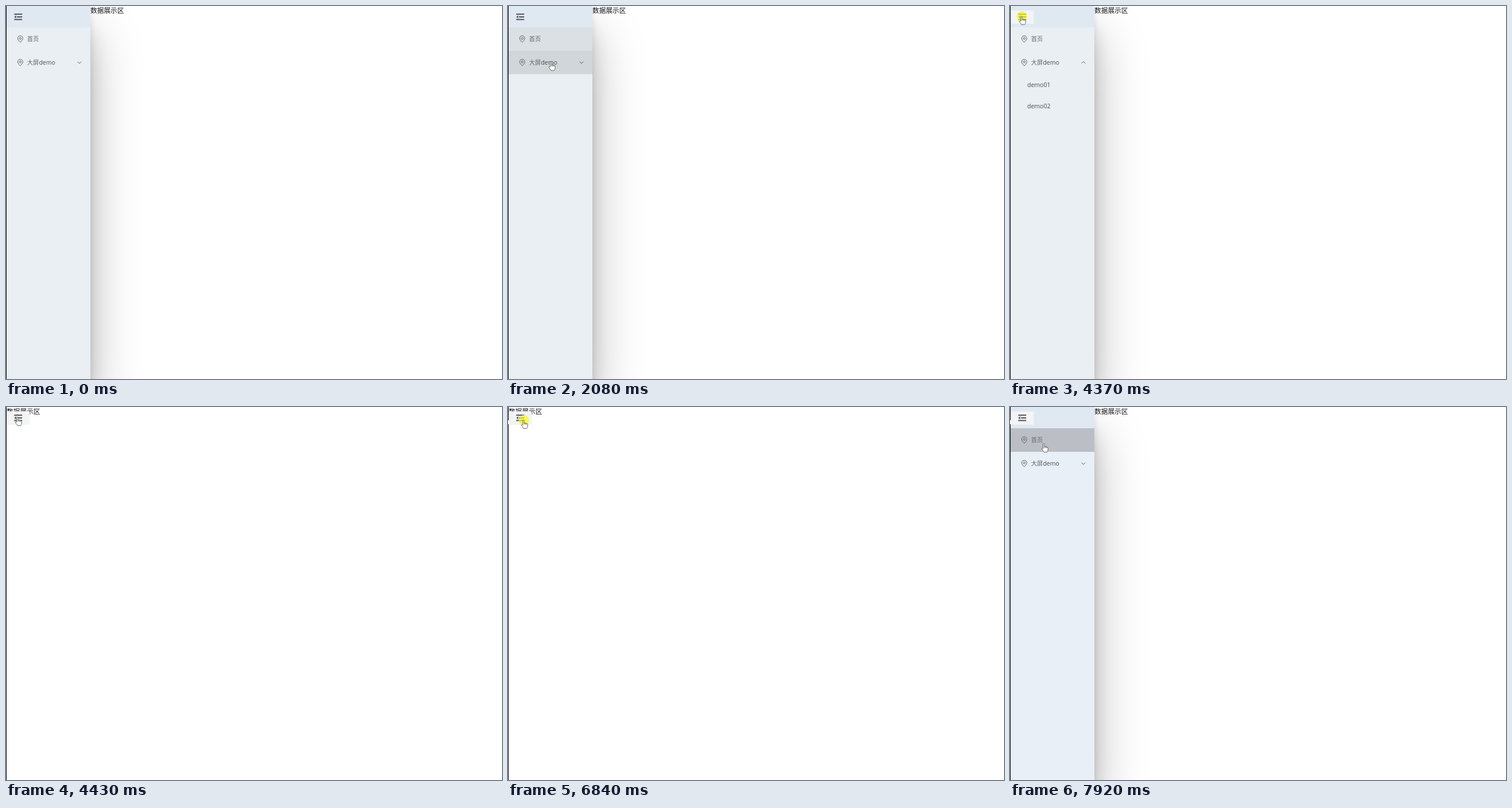
Animation, 864 px wide and 649 px high, one loop 7.99 s. Source, as an HTML page:

```html
<!DOCTYPE html>
<html lang="zh-CN">
<head>
<meta charset="utf-8">
<title>Sidebar menu</title>
<style>
  html, body { margin: 0; width: 100%; height: 100%; overflow: hidden; background: #fff; }
  #stage { position: fixed; inset: 0; overflow: hidden; contain: strict; }
  #shade { position: absolute; left: 1px; top: 0; width: 146px; height: 100%;
    box-shadow: 0 50px 90px rgba(0, 0, 0, .28), 0 40px 34px rgba(0, 0, 0, .12), 0 12px 12px rgba(0, 0, 0, .1); }
  svg { position: absolute; left: 0; top: 0; display: block; }
  text { font: 10.5px "Open Sans", "Noto Sans CJK SC", "Noto Sans CJK", sans-serif; fill: #4a4c50; }
  .cjk { font: 10.25px "Noto Sans CJK SC", "Noto Sans CJK", sans-serif; fill: #63666b; }
  #title { font-size: 11.7px; fill: #111; }
  .line { fill: none; stroke: #5c5f64; stroke-width: 1; }
  .hover { opacity: 0; }
  .pointer { fill: #fff; stroke: #444; stroke-width: .8; stroke-linejoin: round; }
</style>
</head>
<body>
<div id="stage">
  <div id="shade"></div>
  <svg width="864" height="649" viewBox="0 0 864 649">
    <defs>
      <clipPath id="fold"><rect id="foldBox" x="1" y="118.7" width="146" height="0"/></clipPath>
      <g id="pin" class="line">
        <path d="M0 5.6C-2.2 3.2-4.5 1-4.5-1.3A4.5 4.5 0 0 1 4.5-1.3C4.5 1 2.2 3.2 0 5.6Z"/>
        <circle cy="-1.2" r="1.7"/>
      </g>
    </defs>

    <text id="title" class="cjk" y="12.4">数据展示区</text>

    <g id="side">
      <rect id="panel" x="1" width="146" height="649"/>
      <rect x="1" width="146" height="37" fill="#e0e8f2"/>
      <rect id="row1" class="hover" x="1" y="37" width="146" height="41"/>
      <rect id="row2" class="hover" x="1" y="78" width="146" height="40.7"/>
      <use href="#pin" x="24.8" y="57.6"/>
      <use href="#pin" x="24.8" y="98.5"/>
      <text class="cjk" x="36.8" y="61.3">首页</text>
      <text class="cjk" x="36.8" y="102.2">大屏</text>
      <text x="57.4" y="102">demo</text>
      <path id="chevron" class="line" d="M-3.4-1.5L0 1.6L3.4-1.5"/>
      <g clip-path="url(#fold)">
        <text x="30" y="141">demo01</text>
        <text x="30" y="177.6">demo02</text>
      </g>
    </g>

    <rect width="1" height="649"/>
    <rect id="chip" y="23" width="1" height="7" fill="#fff"/>
    <rect id="button" x="1" y="7.5" width="40.5" height="23.5" rx="2" fill="#f2f4f6"/>
    <path fill="#4f5256" d="M14.3 13.2h13.9v2H14.3zM19 17.9h9.2v2H19zM14.3 22.6h13.9v2H14.3zM14.3 18.9l3.4-2.6v5.2z"/>
    <g id="cursor">
      <circle id="ring" cx=".5" cy=".8" r="9" fill="#f8f61a" opacity=".7"/>
      <path id="arrow" class="pointer" d="M.4.5V12L3.1 9.5L5 13.7L6.8 12.9L5 8.8H8.6Z"/>
      <path id="hand" class="pointer" d="M-1.3 9.5V1.6Q-1.3.5-.2.5T.9 1.6V6Q2 5.2 3 6.3Q4.2 5.6 5 6.9Q7.2 6.3 7.2 8.5V11Q7.2 13.5 5.6 15.5H.2Q-1.5 12.8-3.6 10.2Q-4 8.6-2.6 8.6ZM.9 6V8.4M3 6.3V8.5M5 6.9V8.7"/>
    </g>
  </svg>
</div>
<script>
const LOOP = 7990, STEP = 65;
const CLOSE = 4430, REOPEN = 6910;

const $ = id => document.getElementById(id);
const show = (id, on) => { $(id).style.display = on ? '' : 'none'; };
const within = (t, from, to) => t >= from && t < to;
const clamp = v => Math.min(1, Math.max(0, v));
const ease = p => p * p * (3 - 2 * p);

// Fades in from `on` and back out from `off`
const fade = (t, on, off = Infinity) => clamp((t - on) / 250) - clamp((t - off) / 250);

// Pointer strokes: start and end time, then where the stroke ends
const origin = { x: 782, y: 548 };
const strokes = [
  { from: 540, to: 730, x: 161, y: 80 },
  { from: 1800, to: 2150, x: 68, y: 98 },
  { from: 3690, to: 3960, x: 20, y: 17 },
  { from: 4820, to: 4880, x: 47, y: 45 },
  { from: 5420, to: 5690, x: 2, y: 2 },
  { from: 5750, to: 6170, x: 30, y: 24 },
  { from: 6240, to: 6370, x: 27, y: 22 },
  { from: 7590, to: 7850, x: 59, y: 63 }
];

// The pointer is sampled in steps, as a screen recorder does
function pointerAt(t) {
  let { x, y } = origin;
  for (const s of strokes) {
    if (t < s.from) break;
    const count = Math.round((s.to - s.from) / STEP) + 1;
    const p = ease(clamp((Math.floor((t - s.from) / STEP) + 1) / count));
    x += (s.x - x) * p;
    y += (s.y - y) * p;
  }
  return { x, y };
}

function drawPointer(t, open) {
  const { x, y } = pointerAt(t);
  const onButton = x <= 41 && y >= 7 && y <= 31;
  const onMenu = open && x < 147 && y > 37 && y < 119;
  const hand = onButton || onMenu;
  show('cursor', t >= strokes[0].from);
  show('hand', hand);
  show('arrow', !hand);
  show('ring', within(t, 2620, 2750) || within(t, 4370, CLOSE) || within(t, 6700, REOPEN));
  $('cursor').setAttribute('transform', `translate(${x} ${y})`);
}

function draw(t) {
  const open = !within(t, CLOSE, REOPEN);
  show('side', open);
  show('shade', open);
  show('button', t >= 4370);
  show('chip', t >= 5830);
  $('title').setAttribute('x', open ? 147 : 1);
  $('panel').setAttribute('fill', t < REOPEN ? '#e9eff3' : '#e9eff6');

  const hover1 = fade(t, 1870, 1950) + fade(t, 3750, 3820) + fade(t, 7660);
  $('row1').style.opacity = .2 * hover1;
  $('row2').style.opacity = .2 * fade(t, 1950, 3750);

  const unfold = t < CLOSE ? ease(clamp((t - 2620) / 310)) : 0;
  $('foldBox').setAttribute('height', 73 * unfold);
  $('chevron').setAttribute('transform', `translate(127.9 98.3) rotate(${-180 * unfold})`);

  drawPointer(t, open);
}

function tick() {
  draw(performance.now() % LOOP);
  requestAnimationFrame(tick);
}
tick();
</script>
</body>
</html>
```
